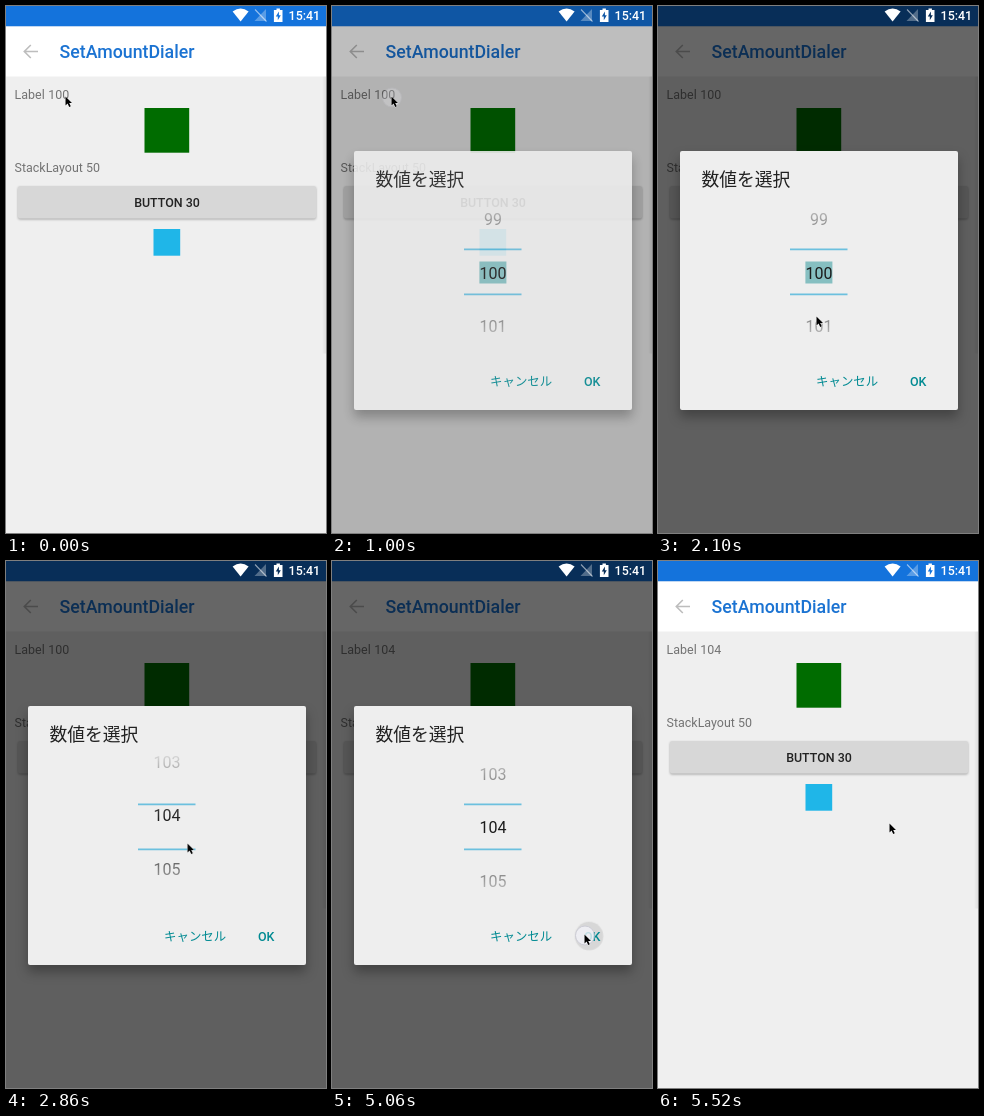
Animation of 320 by 527 pixels, one loop 5.54 s. Source, as an HTML page:

```html
<!DOCTYPE html>
<html lang="ja">
<head>
<meta charset="utf-8">
<title>Number picker</title>
<style>
  html, body { margin: 0; width: 100%; height: 100%; overflow: hidden; background: #efefef; }
  svg { display: block; width: 100vw; height: 100vh; }
  text { font: 12.44px Roboto, "Noto Sans CJK JP", "Noto Sans CJK", sans-serif; white-space: pre; }
  .medium { font-weight: 500; }
  .large { font-size: 17.78px; }
  .mid { text-anchor: middle; }
  .gray { fill: #737373; }
  .accent { fill: #008a92; font-weight: 500; }
  #wheel text { font-size: 16px; text-anchor: middle; fill: #1c1c1c; }
  .sheet { filter: drop-shadow(0 7px 6px rgba(0, 0, 0, .3)); }
  .button { filter: drop-shadow(0 1px 1px rgba(0, 0, 0, .3)); }

  .anim { animation: 5540ms linear infinite; }
  #dim { animation-name: dim; }
  #dialog { animation-name: dialog; }
  #wheel { animation-name: wheel; }
  #mark { animation-name: mark; animation-timing-function: step-end; }
  #before { animation-name: before; animation-timing-function: step-end; }
  #after { animation-name: after; animation-timing-function: step-end; }
  #cursor { animation-name: cursor; animation-timing-function: ease-in-out; }
  #touch { animation-name: touch; }
  #ripple { animation-name: ripple; transform-origin: 257px 375px; }

  @keyframes dim {
    0%, 16.5% { opacity: 0; }
    18.05% { opacity: .25; }
    20.2%, 92.5% { opacity: .6; }
    97%, 100% { opacity: 0; }
  }
  @keyframes dialog {
    0%, 16.5% { opacity: 0; }
    18.05% { opacity: .88; }
    19%, 92.3% { opacity: 1; }
    95%, 100% { opacity: 0; }
  }
  @keyframes wheel {
    0%, 40.8% { transform: translateY(0); }
    43.5% { transform: translateY(-58px); animation-timing-function: cubic-bezier(.2, .6, .5, 1); }
    51.62% { transform: translateY(-226.8px); animation-timing-function: ease-out; }
    54%, 62.3% { transform: translateY(-232px); }
    66.43% { transform: translateY(-219.8px); animation-timing-function: ease-out; }
    71.5%, 100% { transform: translateY(-214.8px); }
  }
  @keyframes mark { 0% { opacity: 1; } 40.6%, 100% { opacity: 0; } }
  @keyframes before { 0% { opacity: 1; } 90.8%, 100% { opacity: 0; } }
  @keyframes after { 0% { opacity: 0; } 90.8%, 100% { opacity: 1; } }
  @keyframes cursor {
    0%, 21% { transform: translate(59px, 90px); }
    30%, 31.5% { transform: translate(206px, 366px); }
    37.9%, 40.6% { transform: translate(158px, 310px); }
    43.5% { transform: translate(163px, 250px); }
    46% { transform: translate(165px, 242px); }
    51.62% { transform: translate(181px, 282px); }
    56%, 58% { transform: translate(204px, 366px); }
    62.3% { transform: translate(166px, 273px); animation-timing-function: linear; }
    66.43% { transform: translate(166px, 286px); }
    70%, 71.5% { transform: translate(167px, 292px); }
    79.5% { transform: translate(252px, 371px); }
    85%, 93% { transform: translate(252px, 373px); }
    99.3%, 100% { transform: translate(231px, 262px); }
  }
  @keyframes touch {
    0%, 13% { opacity: 0; }
    15%, 16.5% { opacity: .8; }
    18.05% { opacity: .25; }
    19%, 40% { opacity: 0; }
    40.6%, 43.5% { opacity: .8; }
    45.5%, 61.8% { opacity: 0; }
    62.3%, 70% { opacity: .8; }
    71.5%, 88% { opacity: 0; }
    88.8%, 91.34% { opacity: .8; }
    92.5%, 100% { opacity: 0; }
  }
  @keyframes ripple {
    0%, 88.5% { opacity: 0; transform: scale(.3); }
    89% { opacity: 1; transform: scale(.4); }
    91% { opacity: 1; transform: scale(1); }
    93%, 100% { opacity: 0; transform: scale(1.1); }
  }
</style>
</head>
<body>
<svg viewBox="0 0 320 527" preserveAspectRatio="none">
  <defs>
    <linearGradient id="fade" x2="0" y2="1">
      <stop offset="0" stop-color="#fff" stop-opacity="0"/>
      <stop offset=".45" stop-color="#fff"/>
      <stop offset=".55" stop-color="#fff"/>
      <stop offset="1" stop-color="#fff" stop-opacity="0"/>
    </linearGradient>
    <linearGradient id="edge">
      <stop offset="0" stop-opacity="0"/>
      <stop offset="1" stop-opacity=".07"/>
    </linearGradient>
    <mask id="window" maskUnits="userSpaceOnUse" x="132" y="186.5" width="58" height="161">
      <rect x="132" y="186.5" width="58" height="161" fill="url(#fade)"/>
    </mask>
  </defs>

  <!-- page -->
  <rect width="320" height="527" fill="#efefef"/>
  <rect width="320" height="20.5" fill="#1473dc"/>
  <rect y="20.5" width="320" height="50" fill="#fff"/>
  <path d="M32 45.5H18.5M24.8 39 18.3 45.5 24.8 52" fill="none" stroke="#bdbdbd" stroke-width="1.6"/>
  <text class="medium large" x="53.6" y="52.3" fill="#1b73d2">SetAmountDialer</text>
  <g class="gray">
    <text x="8.6" y="93.2">Label </text>
    <text id="before" class="anim" x="42.3" y="93.2">100</text>
    <text id="after" class="anim" x="42.3" y="93.2">104</text>
    <text x="8.6" y="165.6">StackLayout 50</text>
  </g>
  <rect x="138.5" y="102" width="44.7" height="44.7" fill="#006c00"/>
  <rect class="button" x="12" y="180" width="298" height="32.5" rx="2" fill="#d7d7d7"/>
  <text class="medium mid" x="161" y="201" fill="#222">BUTTON 30</text>
  <rect x="147.5" y="223" width="26.7" height="26.7" fill="#1fb6e8"/>
  <rect x="316" y="70.5" width="4" height="277" fill="url(#edge)"/>

  <rect id="dim" class="anim" width="320" height="527"/>

  <!-- status icons stay bright above the dimmed page -->
  <g fill="#fff">
    <path d="M234.6 15.5 226.6 5.5Q234.6-.7 242.6 5.5Z"/>
    <path d="M260 3V15H248.5Z" opacity=".3"/>
    <path d="M249 3.5 260.5 15.5" stroke="#fff" stroke-width="1.1" opacity=".55"/>
    <path fill-rule="evenodd" d="M270.5 2.5h3.4v1.4h2.6v12h-8.6v-12h2.6ZM272.9 5.5 269.8 10.6H271.8V14.3L274.8 9.2H272.9Z"/>
    <text class="medium" x="282.6" y="14">15:41</text>
  </g>

  <g id="dialog" class="anim">
    <rect class="sheet" x="22" y="145" width="278" height="259" rx="2" fill="#eee"/>
    <text class="large" x="43.4" y="179.6" fill="#212121">数値を選択</text>
    <rect id="mark" class="anim" x="147.4" y="255.5" width="27" height="22" fill="#86bfc1"/>
    <g mask="url(#window)"><g id="wheel" class="anim"></g></g>
    <path d="M132 243.3H189.5M132 288.3H189.5" stroke="#6cc0de" stroke-width="1.8"/>
    <circle id="ripple" class="anim" cx="257" cy="375" r="14" fill="#d2d2d2"/>
    <text class="accent" x="158" y="380">キャンセル</text>
    <text class="accent" x="252" y="380">OK</text>
  </g>

  <g id="cursor" class="anim">
    <circle id="touch" class="anim" cx="1" cy="1.5" r="9.5" fill="#f4f4fa" stroke="#c8c8d4"/>
    <path d="M.5.5V9.5L2.6 7.6 4.2 11 5.8 10.3 4.2 7H7Z" stroke="#fff" stroke-width=".7" paint-order="stroke"/>
  </g>
</svg>
<script>
  const wheel = document.getElementById("wheel");
  const rowHeight = 53.7;
  for (let n = 98; n <= 107; n++) {
    const row = document.createElementNS(wheel.namespaceURI, "text");
    row.setAttribute("x", 161);
    row.setAttribute("y", 272.5 + (n - 100) * rowHeight);
    row.textContent = n;
    wheel.append(row);
  }
</script>
</body>
</html>
```
